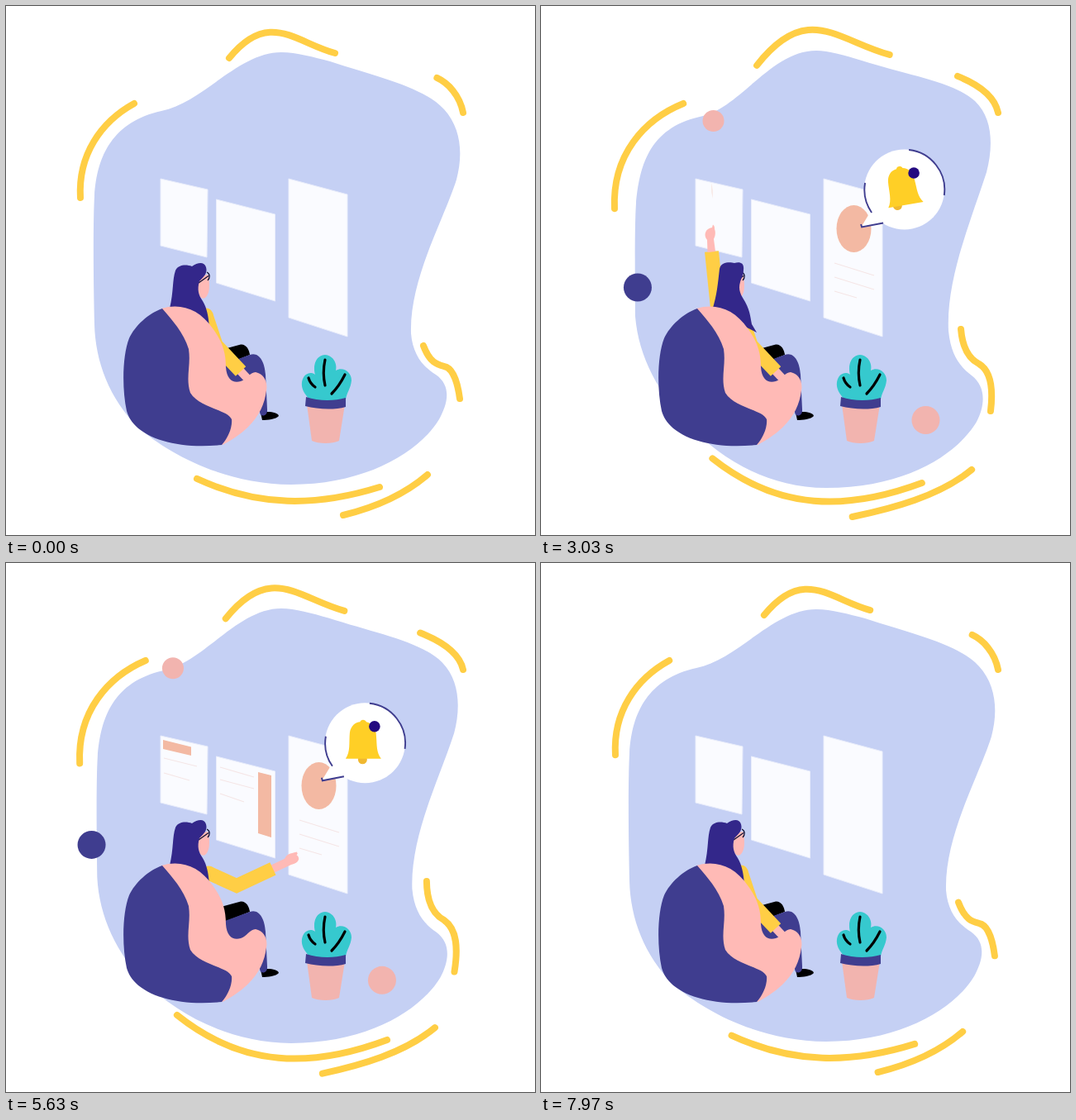
Animation, 640 px wide and 640 px high, one loop 8.01 s. Source, as an HTML page:

```html
<!DOCTYPE html>
<html lang="en">
<head>
<meta charset="utf-8">
<title>Reading corner</title>
<style>
html, body { margin: 0; width: 100%; height: 100%; overflow: hidden; background: #fff; }
svg { display: block; width: 100vw; height: 100vh; }
.swoosh path { fill: none; stroke: #ffce45; stroke-width: 8; stroke-linecap: round; }
.rule { fill: none; stroke: #f5e6e6; stroke-width: 1.2; }
.navy { fill: #3f3d8f; }
.pink { fill: #f2b4af; }
.skin { fill: #ffbab6; }
.peach { fill: #f3b9a3; }
.sleeve { fill: none; stroke: #ffce45; stroke-width: 17; stroke-miterlimit: 8; }
.outline { fill: none; stroke: #3f3d8f; stroke-width: 1.9; }
.vein { fill: none; stroke: #000; stroke-width: 3.2; stroke-linecap: round; }
</style>
</head>
<body>
<svg viewBox="0 0 640 640">
  <path id="blob" fill="#c5d0f4"/>
  <g id="swooshes" class="swoosh"></g>

  <circle id="dotTop" class="pink" r="13"/>
  <circle id="dotLeft" class="navy" r="17"/>
  <circle id="dotLow" class="pink" r="17"/>

  <g fill="#fafbff" stroke="#e9edfb">
    <path d="M187 209L244 222L243 304L187 290Z"/>
    <path d="M254.5 234L325.5 252V357L254.5 335Z"/>
    <path d="M342 209L413 228V400L342 377Z"/>
  </g>
  <path id="rules1" class="rule" d="M191 236L231 246M191 254L222 263"/>
  <path id="rect1" class="peach" d="M190 214L224 222.5V233L190 225Z"/>
  <path id="rules2" class="rule" d="M259 247L300 259M259 262L300 273M259 279L288 289"/>
  <path id="rect2" class="peach" d="M305 253L321 257V332L305 327Z"/>
  <path id="rules3" class="rule" d="M355 311L403 326M355 328L403 343M355 345L382 353"/>
  <ellipse id="oval" class="peach" cx="378.5" cy="269.5" rx="21" ry="28.5"/>

  <g id="bubble">
    <circle cx="436.5" cy="221" r="48.5" fill="#fff"/>
    <path d="M396 247L384.5 266L420 260Z" fill="#fff"/>
    <path class="outline" d="M442 173A48.5 48.5 0 0 1 484.7 228M389 213A48.5 48.5 0 0 0 397 249M384 263L385 266.5L411 261.5"/>
    <circle id="clapper" cx="433.5" cy="241" r="5.5" fill="#f0b830"/>
    <path id="bell" fill="#ffcf26" d="M413 240C419 232 417 220 418 209C419 200 425 196 430.5 195.5C431 192 437 192 438 195.5C445 197 450 203 450 212C451 224 450 232 456 240Z"/>
    <circle cx="448" cy="201" r="6.8" fill="#240a80"/>
  </g>

  <path d="M260 416L284 409.5C291 409 294 416 295 422L262 435Z"/>
  <path d="M308 492C316 490 329 491 330 496C327 500 316 501 310 501Z"/>
  <path class="navy" d="M262 434L295 422C306 418 313 430 314 446L316 488C317 497 307 498 307 491L300 472L262 460Z"/>

  <g id="raised">
    <path class="sleeve" d="M206.5 297L214 370"/>
    <path class="skin" d="M201.5 298L201 283C196 277 199 269 207 268L208 264.5C210 266 210 268 210 270C212 275 210 280 209 282L211 297Z"/>
  </g>
  <path id="hand" class="skin"/>
  <path id="arm" class="sleeve"/>
  <circle id="shoulder" r="8.5" fill="#ffce45"/>
  <g id="head">
    <path class="skin" d="M231 333C238 328 242 323 245 326C246 333 247 344 244 349C242 354 238 355 235 352C232 347 231 340 231 333Z"/>
    <path d="M233 335L245 326.5M243 322C247 324 247 329 244 332" fill="none" stroke="#111133" stroke-width="1.3"/>
    <path id="hair" fill="#33278a"/>
  </g>

  <path class="skin" d="M188 366C212 359 234 367 250 390C261 405 266 418 266 437C267 452 275 457 284 454C291 452 295 443 302 443C312 445 317 455 315 465C312 490 298 512 262 531L215 480Z"/>
  <path class="navy" d="M189 366C172 372 156 387 149 402C141 422 140 462 146 490C155 522 205 537 261 531C270 521 274 508 273 500C268 488 235 487 223 468C217 450 224 435 221 415C215 395 201 380 189 366Z"/>

  <path class="pink" d="M364 482H410L403 526C395 530 378 530 370 526Z"/>
  <path fill="#36c9ce" d="M367 476C360 468 357 462 358 455C360 444 369 442 374 446C371 434 375 423 386 422C397 423 401 434 399 441C408 436 418 443 418 453C417 463 412 468 411 476C397 480 380 479 367 476Z"/>
  <path class="navy" d="M363 473C378 478 397 478 411 474V485C397 489 377 488 362 484Z"/>
  <path class="vein" d="M386 428C383 442 384 450 386 459M366 450Q368 457 374 461M410 446Q403 460 394 469"/>
</svg>
<script>
const LOOP = 8010;
const $ = id => document.getElementById(id);
const set = (id, attrs) => {
  for (const name in attrs) $(id).setAttribute(name, attrs[name]);
};

// Blends two paths with the same commands; k may exceed 1.
function mix(a, b, k) {
  const to = b.match(/-?[\d.]+/g);
  let i = 0;
  return a.replace(/-?[\d.]+/g, n => (+n + (to[i++] - n) * k).toFixed(2));
}

// Rises from 0 to a peak, then falls evenly until the loop ends.
const tent = (t, { peak, height, power = 1 }) =>
  height * (t < peak ? (t / peak) ** power : (LOOP - t) / (LOOP - peak));

function ramp(t, from, length) {
  const k = Math.min(1, Math.max(0, (t - from) / length));
  return k * k * (3 - 2 * k);
}
const pulse = (t, inAt, outAt, length = 450) => ramp(t, inAt, length) - ramp(t, outAt, length);

const morphs = [
  { id: 'blob', peak: 2500, height: 1.1,
    a: 'M333 56C352 56 372 62 392 67C450 86 505 98 530 125C551 148 553 180 545 210C530 258 488 330 490 396C492 422 505 437 520 446C540 460 534 482 524 500C500 540 435 579 345 579C260 578 195 540 160 510C125 475 108 430 107 385C106 340 105 270 107 230C110 180 130 140 188 127C238 117 281 56 333 56Z',
    b: 'M333 54C348 54 368 60 388 66C445 84 500 92 525 115C547 136 547 170 539 201C520 260 490 330 493 393C496 424 508 437 521 447C538 460 538 482 527 503C505 540 445 583 345 583C272 583 215 545 180 508C143 470 118 425 114 375C114 340 113 270 115 240C119 195 130 148 192 134C240 125 278 54 333 54Z' },
  { id: 'top', peak: 1860, height: 1.22,
    a: 'M270 63C318 4 350 44 398 57', b: 'M261 72C322 -6 359 42 422 59' },
  { id: 'left', peak: 4050, height: 1.35,
    a: 'M155 118C115 140 87 180 90 232', b: 'M172 118C125 137 86 180 89 245' },
  { id: 'topRight', peak: 5390, height: 1.35, power: .42,
    a: 'M522 87C535 93 549 108 553 129', b: 'M505 85C530 95 549 110 553 129' },
  { id: 'lowRight', peak: 5170, height: 1.55, power: .81,
    a: 'M505 411C513 432 522 434 530 436C542 438 547 460 549 475',
    b: 'M508 391C510 415 518 427 530 433C545 442 547 465 544 490' },
  { id: 'bottom', peak: 4530, height: 1.47,
    a: 'M231 572C305 606 375 606 452 582', b: 'M207 547C287 611 370 611 461 577' },
  { id: 'bottomRight', peak: 4050, height: 1.35,
    a: 'M408 616C445 607 480 593 510 567', b: 'M377 618C425 608 482 593 521 561' }
];
for (const { id } of morphs.slice(1)) {
  const path = document.createElementNS('http://www.w3.org/2000/svg', 'path');
  path.id = id;
  $('swooshes').append(path);
}

// Slow ellipses; start in degrees, speed in degrees per ms.
const orbits = [
  { id: 'dotTop', x: 208.5, y: 132, rx: 9, ry: 7, start: -66, speed: .0514 },
  { id: 'dotLeft', x: 110, y: 337, rx: 8.5, ry: 6, start: -86, speed: .04 },
  { id: 'dotLow', x: 457, y: 499, rx: 9, ry: 6, start: -77, speed: .032 }
];

// Shoulder, elbow, wrist and finger length.
const rest = [242, 374, 254, 410, 284, 442, 36];
const ahead = [242, 375, 278, 385.5, 322, 375, 42];
const upward = [245, 376, 283, 363, 297.5, 320.5, 40];
const low = [245, 375, 279, 390.5, 323, 370, 35];

const hairSide = 'M198 366C203 345 201 332 205 320C209 312 219 313 225 315C232 310 240 309 242 316C244 323 240 327 234 333C231 343 233 350 238 357C243 365 245 376 246 388L205 392Z';
const hairBack = 'M207 368C213 350 214 335 216 318C218 309 229 310 234 311C241 309 246 311 245 319C245 326 242 330 241 334C239 341 240 346 244 353C253 367 253 375 255 385C261 395 260 405 261 414L210 392Z';

function scaleAt(id, x, y, sx, sy, dx = 0, dy = 0) {
  set(id, {
    transform: `translate(${x + dx} ${y + dy}) scale(${sx} ${sy}) translate(${-x} ${-y})`,
    visibility: sx * sy > .0005 ? 'visible' : 'hidden'
  });
}

function drawWoman(t) {
  const toAhead = pulse(t, 350, 1750, 700);
  const toUpward = pulse(t, 3650, 5000, 650);
  const toLow = pulse(t, 5000, 5750, 650);
  const [sx, sy, ex, ey, wx, wy, tip] = rest.map((v, i) =>
    v + toAhead * (ahead[i] - v) + toUpward * (upward[i] - v) + toLow * (low[i] - v));
  const angle = Math.atan2(wy - ey, wx - ex) * 180 / Math.PI;
  set('arm', { d: `M${sx} ${sy}L${ex} ${ey}L${wx} ${wy}` });
  set('shoulder', { cx: sx, cy: sy });
  set('hand', {
    d: `M-2 -5L18 -5C24 -9 ${tip - 10} -8 ${tip} -6C${tip - 1} -4 36 -4 33 -3C36 2 32 7 22 5L-2 5Z`,
    transform: `translate(${wx} ${wy}) rotate(${angle})`
  });

  const turn = pulse(t, 2150, 3300, 600);
  set('raised', {
    transform: `translate(0 ${(1 - turn) * 110}) rotate(${(1 - turn) * 25} 214 370)`,
    visibility: turn > .01 ? 'visible' : 'hidden'
  });
  const lean = toAhead + toUpward * .8;
  set('head', { transform: `matrix(1 0 ${-.13 * lean} 1 ${44.5 * lean} ${-2.5 * lean})` });
  set('hair', { d: mix(hairSide, hairBack, turn) });
}

function drawBoards(t) {
  const show = inAt => pulse(t, inAt, 7150);
  scaleAt('oval', 378.5, 269.5, show(1350), show(1350));
  scaleAt('rules3', 355, 330, show(1650), 1);
  scaleAt('rect1', 207, 223, show(3000), 1);
  scaleAt('rules1', 191, 245, show(3250), 1);
  scaleAt('rect2', 313, 292, 1, show(4620));
  scaleAt('rules2', 259, 265, show(4850), 1);
}

function drawBubble(t) {
  const size = pulse(t, 2000, 7200);
  scaleAt('bubble', 384, 266, size, size, (4570 - t) * .002, 1 - 4.5 * ramp(t, 3600, 2400));
  const k = Math.min(1, Math.max(0, (t - 2430) / 1400));
  const swing = 17 * (1 - k) * Math.sin(k * Math.PI * 3.5);
  set('bell', { transform: `rotate(${swing} 433.5 217)` });
  set('clapper', { transform: `rotate(${-swing} 433.5 210)` });
}

function draw(t) {
  for (const m of morphs) set(m.id, { d: mix(m.a, m.b, tent(t, m)) });
  const grow = pulse(t, 350, 5950, 500);
  for (const o of orbits) {
    const a = (o.start + o.speed * t) * Math.PI / 180;
    scaleAt(o.id, 0, 0, grow, grow, o.x + o.rx * Math.cos(a), o.y + o.ry * Math.sin(a));
  }
  drawBoards(t);
  drawBubble(t);
  drawWoman(t);
}

const start = performance.now();
function tick() {
  draw((performance.now() - start) % LOOP);
  requestAnimationFrame(tick);
}
tick();
</script>
</body>
</html>
```
